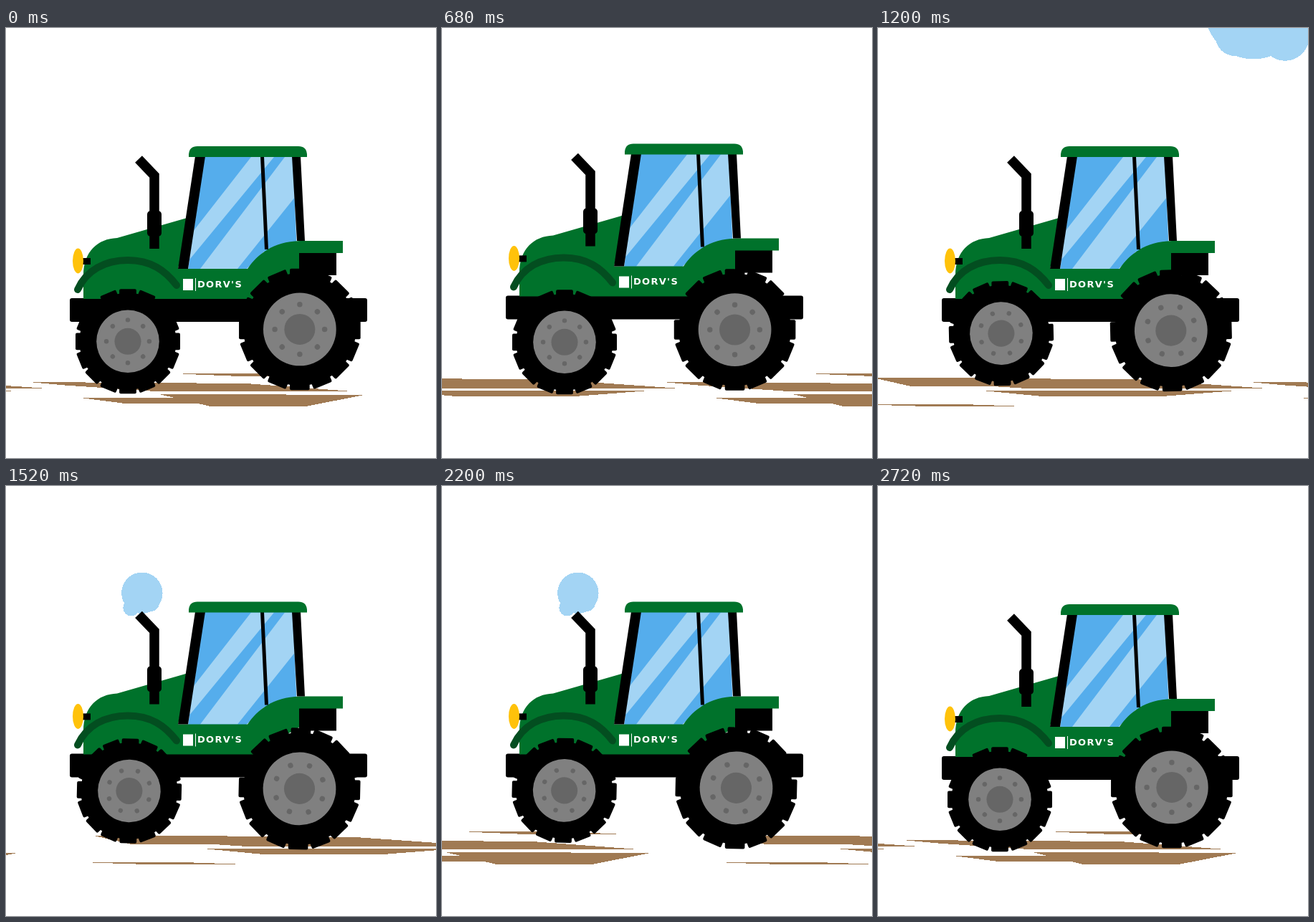
Animation of 600 by 600 pixels, one loop 2.76 s. Source, as an HTML page:

```html
<!DOCTYPE html>
<html lang="en">
<head>
<meta charset="utf-8">
<title>Tractor</title>
<style>
  html, body { margin: 0; width: 100%; height: 100%; overflow: hidden; background: #fff; }
  svg { display: block; width: 100%; height: 100%; }
  text { font: bold 13px "DejaVu Sans", sans-serif; letter-spacing: 1.3px; }
  #ground, #smoke { shape-rendering: crispEdges; }
</style>
</head>
<body>
<svg viewBox="0 0 600 600">
  <defs>
    <clipPath id="glass"><path d="M277 179H400L406 312H360L335 337H254Z"/></clipPath>
  </defs>
  <g id="ground" fill="#a07a53"></g>
  <g id="smoke" fill="#a3d4f4"></g>
  <g id="body">
    <g clip-path="url(#glass)">
      <path fill="#55adec" d="M240 170H420V340H240Z"/>
      <path fill="#a3d4f4" d="M342 180H374L257 322L250 298ZM389 180H448L323 336H271Z"/>
    </g>
    <path d="M409 312H461V345H409Z"/>
    <rect x="89" y="377" width="415" height="33" rx="3"/>
    <path fill="#00722b" d="M256 264L155 293C128 294 108 312 108 345V378H345L409 340V314H470V297H410C372 298 351 316 337 336H240Z"/>
    <path d="M264 179H278L254 336H240ZM399 179H411L417 297H406ZM355 179H360L366 309H361Z"/>
    <path fill="#00722b" d="M255 180V176Q256 165 267 165H408Q419 165 420 176V180Z"/>
    <path fill="none" stroke="#034e20" stroke-width="10" stroke-linecap="round" d="M100 365C112 338 138 324 170 324S222 338 238 359"/>
    <path d="M106 321H118V330H106Z"/>
    <ellipse cx="100.5" cy="325" rx="7.5" ry="17.5" fill="#ffc20a"/>
    <path fill="none" stroke="#000" stroke-width="13.5" d="M185 183L207 206V308"/>
    <rect x="197" y="255" width="20" height="36" rx="5"/>
    <g fill="#fff">
      <path d="M247 350H261V366H247ZM264 349H265V367H264Z"/>
      <text x="267" y="362">DORV'S</text>
    </g>
  </g>
  <g id="front"></g>
  <g id="rear"></g>
</svg>
<script>
const LOOP = 2760, STEP = 40, TURN = 2720, PUFF = 680;
const SPEED = 0.405, TRACK = 1100;
const get = id => document.getElementById(id);

function add(parent, tag, attrs) {
  const el = document.createElementNS("http://www.w3.org/2000/svg", tag);
  for (const key in attrs) el.setAttribute(key, attrs[key]);
  return parent.appendChild(el);
}

const place = (el, x, y, turn = 0) =>
  el.setAttribute("transform", `translate(${x} ${y}) rotate(${turn})`);

function buildWheel(g, radius) {
  const half = radius * 0.163, grey = "#666";
  add(g, "circle", { r: radius * 0.925 });
  for (let i = 0; i < 16; i++) {
    add(g, "rect", { x: -half, y: -radius, width: half * 2, height: radius * 0.3, rx: 2, transform: `rotate(${i * 22.5})` });
  }
  add(g, "circle", { r: radius * 0.6, fill: "#808080" });
  add(g, "circle", { r: radius * 0.254, fill: grey });
  for (let i = 0; i < 8; i++) {
    add(g, "circle", { cy: -radius * 0.41, r: radius * 0.044, fill: grey, transform: `rotate(${i * 45})` });
  }
}
buildWheel(get("front"), 73);
buildWheel(get("rear"), 84.8);

// Soil streaks: a wedge trails to a low right tip, a slab is wide on top.
const streaks = [];
function streak(x, y, w, h, ...corners) {
  const points = corners.map(([u, v]) => [u * w, y + v * h]).join(" ");
  streaks.push({ x, el: add(get("ground"), "polygon", { points }) });
}
const wedge = (x, y, w, h) => streak(x, y, w, h, [0, 0], [0.67, 0.15], [1, 1], [0.39, 1], [0.11, 0.35]);
const slab = (x, y, w, h) => streak(x, y, w, h, [0, 0], [1, 0.05], [0.72, 1], [0.24, 1]);

wedge(238, 482, 225, 4);
wedge(594, 525, 225, 3);
wedge(33, 494, 450, 13);
wedge(-493, 488, 550, 15);
slab(-493, 488, 220, 12);
slab(-340, 506, 348, 8);
slab(100, 515.5, 260, 8);
slab(214, 511, 287, 16.5);

// Each lobe has its place and radius in the full puff, and its shift while drifting off.
const lobe = (x, y, r, shiftX = 0, shiftY = 0) =>
  ({ x, y, r, shiftX, shiftY, el: add(get("smoke"), "circle", {}) });
const lobes = [
  lobe(212, 119, 50),
  lobe(186, 155, 20),
  lobe(238, 137, 25, 18, 18),
  lobe(253, 92, 39, 115),
  lobe(262, 92, 19, 233)
];

function drawSmoke(age) {
  const swell = Math.min(1, (age / 320) ** 0.8);
  const drift = Math.max(0, age - 320) / 200, grow = drift ** 2;
  for (const { x, y, r, shiftX, shiftY, el } of lobes) {
    const size = swell ** (1 + shiftX / 115);
    el.setAttribute("cx", 160 + (x - 160) * size + (312 + shiftX) * grow);
    el.setAttribute("cy", 190 + (y - 190) * size + shiftY * grow - 143 * drift ** 1.6);
    el.setAttribute("r", r * size * (1 + 0.35 * grow));
  }
}

const raised = (t, half) => Math.floor(t / half) % 2;

function draw(t) {
  for (const { x, el } of streaks) {
    const pos = x + SPEED * t;
    place(el, pos > 600 ? pos - TRACK : pos, 0);
  }
  drawSmoke(t % PUFF);
  place(get("body"), 0, -3.6 * raised(t, 58.6));
  const angle = t / TURN * 2 * Math.PI, turn = -t / TURN * 360;
  place(get("front"), 171 - Math.cos(angle), 437.3 - 11.5 * raised(t, 55.9) + Math.sin(angle), turn);
  place(get("rear"), 409.5 + Math.cos(angle + 1.2), 421.4 - 7.2 * raised(t, 54) - Math.sin(angle + 1.2), turn);
}

const start = performance.now();
function tick() {
  const t = (performance.now() - start) % LOOP;
  draw(Math.floor(t / STEP) * STEP);
  requestAnimationFrame(tick);
}
tick();
</script>
</body>
</html>
```
